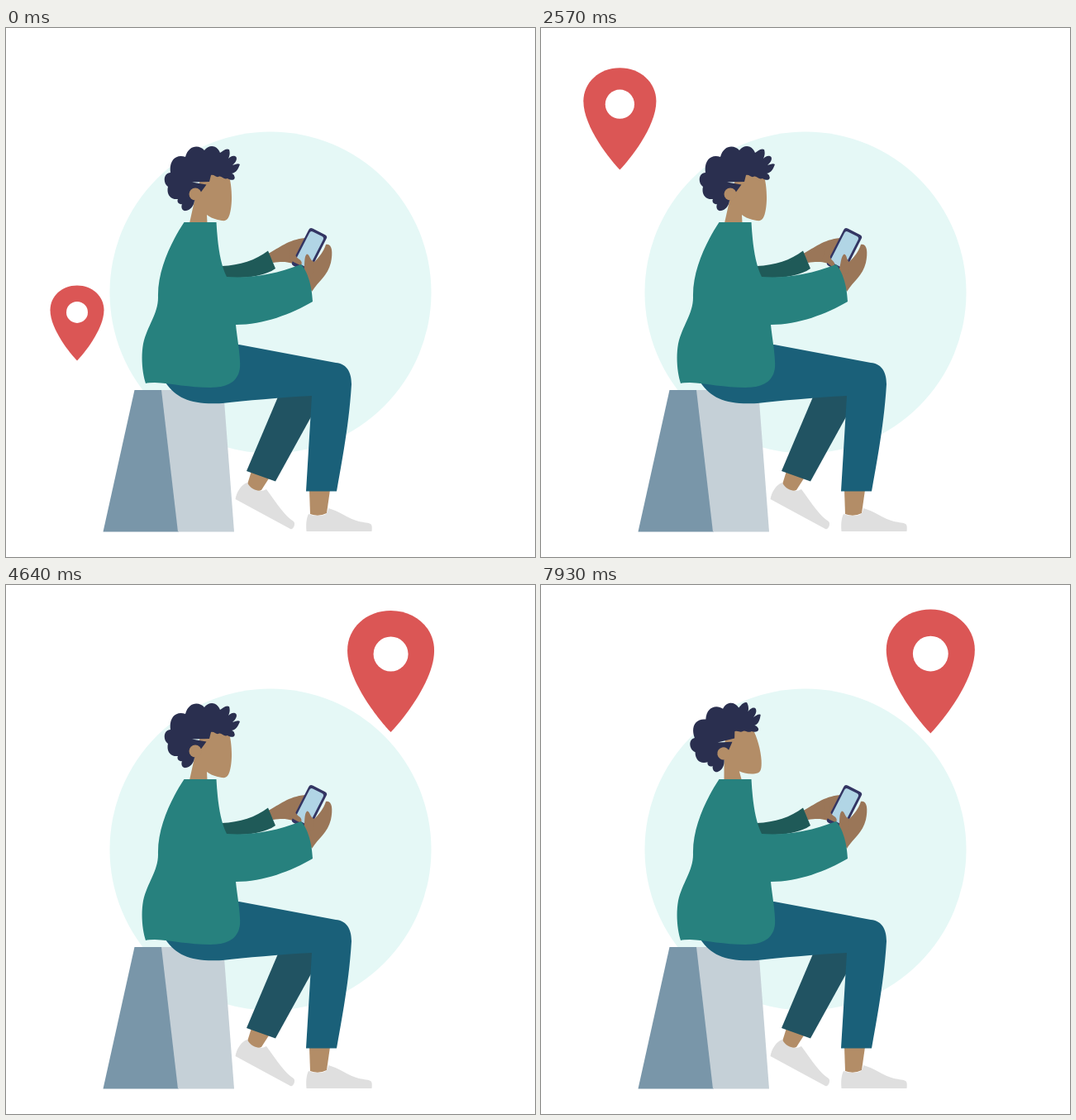
An HTML page for the animation above (8000 ms loop, 640 by 640 pixels).

```html
<!DOCTYPE html>
<html lang="en">
<head>
<meta charset="utf-8">
<title>Waiting with a phone</title>
<style>
  html, body { margin: 0; width: 100%; height: 100%; overflow: hidden; background: #fff; }
  svg { display: block; width: 100vw; height: 100vh; }
  .skin { fill: #b38d67; }
  .hand { fill: #9a7658; }
  .hair { fill: #2a2f4f; }
  .shoe { fill: #dfdfdf; }
</style>
</head>
<body>
<svg viewBox="0 0 640 640">
  <circle cx="320" cy="320" r="194.5" fill="#e5f8f6"/>

  <!-- seat -->
  <path fill="#7996a9" d="M155.5 438H190L209 609.5H117.5Z"/>
  <path fill="#c5d0d7" d="M188 438H263L276 609.5H208Z"/>

  <!-- legs -->
  <path class="skin" d="M297 536L318 545L309 559C303 562 295 558 292 552Z"/>
  <path class="shoe" d="M292 550C285 552 279 561 277.5 570L344 606C347 608 351 600 348 597C338 591 328 576 315 558C308 562 297 560 292 550Z"/>
  <path fill="#215362" d="M330 444H371V467L326 548.5L291 536Z"/>
  <path class="skin" d="M367 559H392L388 587Q378 592 368 588Z"/>
  <path class="shoe" d="M366 588C363 594 363 601 363.5 609H442.5C443 605 443 601 441 600C437 598 430 598 427 597C415 594 402 584 390 581C389 588 386 590 378 590C372 590 369 589 366 588Z"/>
  <path fill="#1a6079" d="M193 429L230 390L282 383L399 405C412 406 418 416 418 431C415 480 407 520 400 560.5H363L370 445C330 447 290 451 262 454C225 456 207 449 193 429Z"/>

  <!-- head -->
  <g id="head">
    <path class="skin" d="M236 180L246 174L270 180C273 190 274 207 272 219C270 230 268 234 261 233C253 232 247 229 243 226L244 246H219L222 236L228 209Z"/>
    <path class="hair" d="M246 186L248 178C252 177 254 181 257 180C261 178 263 184 268 182C272 185 278 184 276.5 180C276 177 274 176 273 176C279 175 281 170 283 165C281 163 277 165 274 166C280 161 280 156 277 155C274 154 271 156 269 158C271 154 271 150 270 147C266 145 262 149 259 151C256 142 246 140 240 148C234 141 221 141 217 156C205 152 197 161 199 175C191 175 189 187 196 192C194 200 198 208 208 207C206 211 210 214 213 213C211 218 214 222 218 221C223 220 227 216 228 209L237 197L242.500 189.500L225 186.500Z"/>
    <circle class="skin" cx="229" cy="201" r="7.500"/>
  </g>

  <!-- back arm, phone, front arm -->
  <path class="hand" d="M317 273C331 266 341 256 362 254L366 260L352 287C347 285 340 281 323 284Z"/>
  <path fill="#1f5a58" d="M261 288C283 287 302 281 317 269.500L326 291C312 301 288 303 266 302Z"/>
  <g transform="translate(367 269) rotate(27)">
    <rect x="-12" y="-25.500" width="24" height="51" rx="3.500" fill="#333563"/>
    <rect x="-9.500" y="-22" width="18.500" height="42" rx="3" fill="#b1d5e5"/>
  </g>
  <path class="hand" d="M387 262C394 260 396 270 393 284C389 300 378 306 370 319L360 294L372 284C379 277 384 271 387 262Z"/>
  <path class="hand" id="thumbR" d="M360 296C362 286 360 277 364 273.500C368 274 367 281 373 283L371 297Z"/>
  <path class="hand" id="thumbL" d="M344 266L348 266C349 273 350 277 355 280C358 282 359 286 356 287C351 285 346 282 342 279Z"/>
  <path fill="#27817e" d="M215.500 235H254.500C256 262 259 285 267 301C297 303 326 298 357 286C363 292 370 308 371 331C345 346 312 359 278 359C280 378 284 398 283 411C281 428 268 435 247 435C222 435 200 430 180 429Q172 429 169 430C165 418 163 399 166 382C171 360 184 346 184 326C183 292 201 257 215.500 235Z"/>

  <!-- pin, 120 wide at scale 1, centred on the origin -->
  <g id="pin">
    <path fill="#db5655" d="M0 84C-14 70-60 14-60-29C-60-60-34-84 0-84C34-84 60-60 60-29C60 14 14 70 0 84Z"/>
    <circle cy="-24" r="24" fill="#fff"/>
  </g>
</svg>
<script>
const LOOP = 8000;
const [head, pin, thumbL, thumbR] =
  ['head', 'pin', 'thumbL', 'thumbR'].map(id => document.getElementById(id));

// Smooth 0..1 ramp between two times
function ease(t, from, to) {
  const u = Math.min(1, Math.max(0, (t - from) / (to - from)));
  return u * u * (3 - 2 * u);
}

function turn(el, angle, x, y) {
  el.setAttribute('transform', `rotate(${angle} ${x} ${y})`);
}

function draw(t) {
  const x = 86 + 1.3 * ease(t, 0, 2300) + 384 * ease(t, 2359, 4819);
  const y = 357 - 247 * ease(t, -30, 2390) - 5.5 * ease(t, 2390, 4300);
  const width = 65 + 40 * ease(t, 0, 4660)
    + 16.5 * (ease(t, 4640, 6020) - ease(t, 6030, 8480));
  pin.setAttribute('transform', `translate(${x} ${y}) scale(${width / 120})`);

  turn(head, -12.5 * ease(t, 6385, 7105), 238, 240);

  const tap = t < 6400 ? (1 - Math.cos(t / 1600 * 2 * Math.PI)) / 2 : 0;
  turn(thumbR, 9 * tap, 366, 294);
  turn(thumbL, 12 * tap, 343, 272);
}

function tick(now) {
  draw(now % LOOP);
  requestAnimationFrame(tick);
}

draw(0);
requestAnimationFrame(tick);
</script>
</body>
</html>
```
